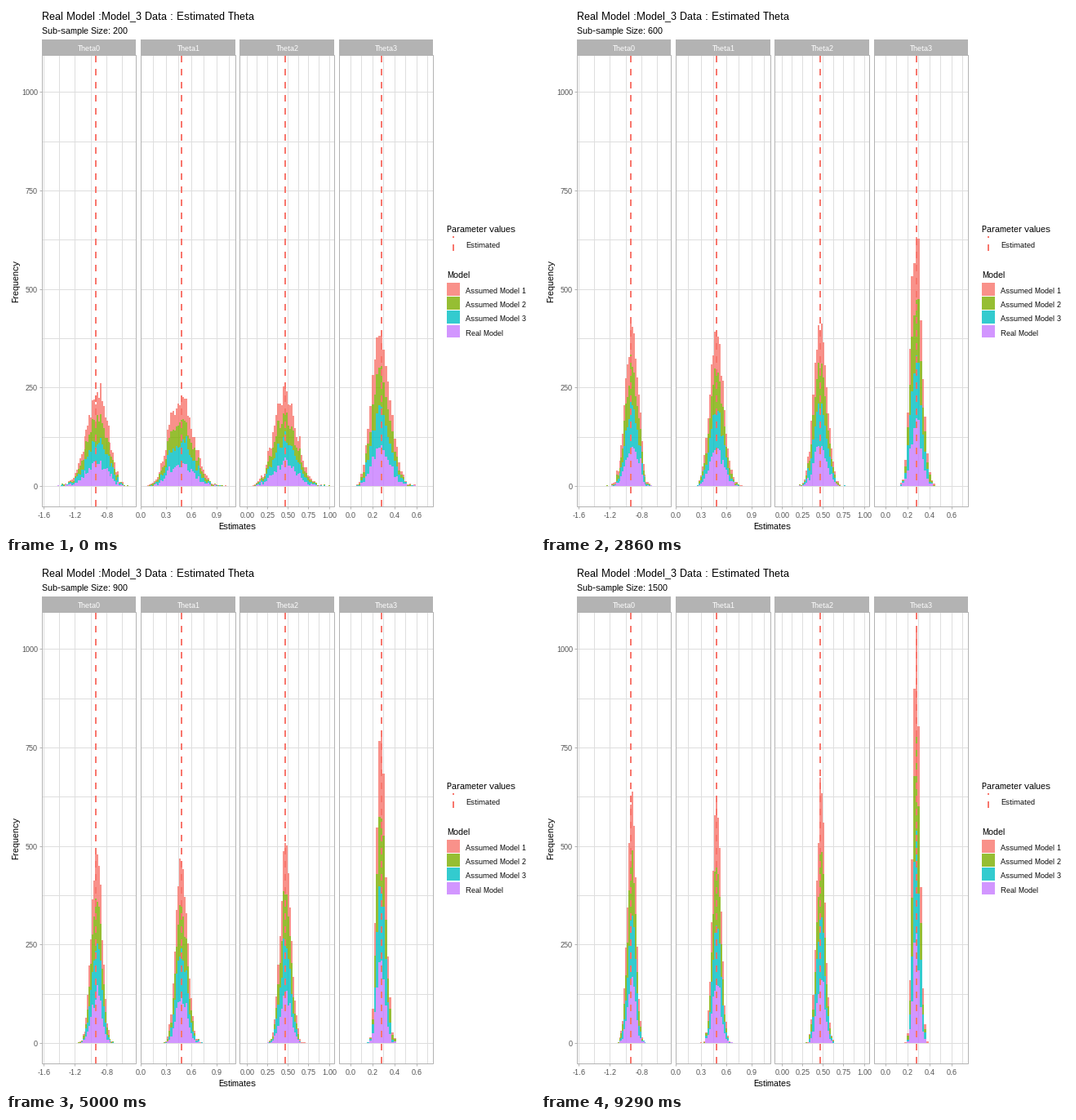
A matplotlib script for the animation above (10000 ms loop, 648 by 648 pixels).

```python
import numpy as np
import matplotlib.pyplot as plt
from matplotlib.animation import FuncAnimation
from matplotlib.patches import Rectangle

plt.rcParams.update({
    "font.family": "Liberation Sans",
    "text.hinting": "native",
    "text.hinting_factor": 1,
})

SIZE = 648
TOP, BOTTOM = 60, 613
SAMPLES = range(200, 1501, 100)
LOOP, STEPS = 10000, 200
BIN = 0.02
RUNS = 1000
GRID, FRAME, TICK_TEXT = "#DEDEDE", "#B3B3B3", "#4D4D4D"
RED = "#F8766D"
# bottom of the stack first
MODELS = [("Real Model", "#C77CFF"), ("Assumed Model 3", "#00BFC4"),
          ("Assumed Model 2", "#7CAE00"), ("Assumed Model 1", RED)]

# left, right, x of zero, px per unit, ticks, format, line x, mean, sd at 1500, skew
PANELS = [
    (44, 159, 201.0, 96.75, (-1.6, -1.2, -0.8), "%.1f", 110, -0.930, 0.0500, -0.06),
    (165, 281, 165.3, 103.3, (0, 0.3, 0.6, 0.9), "%.1f", 215, 0.484, 0.0505, 0.035),
    (286, 402, 295.0, 101.3, (0, 0.25, 0.5, 0.75, 1), "%.2f", 342, 0.468, 0.0490, 0.03),
    (408, 523, 422.2, 135.0, (0, 0.2, 0.4, 0.6), "%.1f", 460, 0.2785, 0.0301, 0.06),
]

fig = plt.figure(figsize=(9, 9), dpi=72, facecolor="white")
ax = fig.add_axes([0, 0, 1, 1])
ax.set_xlim(0, SIZE)
ax.set_ylim(SIZE, 0)
ax.axis("off")


def y_px(count):
    return 588.3 - 0.4824 * count


def text(x, y, s, size=9, color="black", ha="left", **kw):
    return ax.text(x, y, s, size=size, color=color, ha=ha, va="baseline", zorder=6, **kw)


def line(x0, y0, x1, y1, color, z):
    # whole coordinates snap to the middle of that pixel
    ax.plot([x0, x1], [y0, y1], color=color, lw=1, zorder=z, solid_capstyle="butt")


def box(x, y, w, h, color, **kw):
    ax.add_patch(Rectangle((x, y), w, h, fc=color, lw=0, antialiased=False, **kw))


def dashed(x, y0, y1):
    ax.plot([x, x], [y0, y1], color=RED, lw=2, ls=(0, (4, 4)), zorder=4,
            dash_capstyle="butt")


def draw_panel(k, panel):
    left, right, zero, scale, ticks, fmt, mark = panel[:7]
    for v in range(0, 1001, 125):
        y = int(y_px(v))
        line(left, y, right, y, GRID, 1)
    half = (ticks[1] - ticks[0]) / 2
    for j in range(-1, 2 * len(ticks) + 1):
        x = int(zero + scale * (ticks[0] + j * half))
        if left < x < right:
            line(x, TOP, x, BOTTOM, GRID, 1)
    dashed(mark, BOTTOM, TOP)
    ax.add_patch(Rectangle((left, TOP), right - left, BOTTOM - TOP,
                           fill=False, ec=FRAME, lw=1, zorder=5))
    box(left, 41, right - left, 20, FRAME, zorder=5)
    text((left + right + 1) / 2, 55, f"Theta{k}", 9, "white", "center")
    for t in ticks:
        x = int(zero + scale * t)
        line(x, BOTTOM, x, BOTTOM + 3, FRAME, 5)
        text(x + 0.5, 627, fmt % t, 9, TICK_TEXT, "center")


def draw_legend():
    text(540, 277, "Parameter values", 11)
    dashed(548, 300, 282)
    text(563, 296, "Estimated")
    text(540, 333, "Model", 11)
    for i, (name, color) in enumerate(reversed(MODELS)):
        y = round(339.25 + 17.1 * i)
        bottom = round(354.9 + 17.1 * i)
        box(540, y, 16, bottom - y, color, alpha=0.8)
        text(563, y + 13, name)


def bin_edges(panel):
    left, right, zero, scale = panel[:4]
    first = np.ceil((left - zero) / scale / BIN)
    last = np.floor((right - zero) / scale / BIN)
    return (np.arange(first, last + 1) - 0.5) * BIN


for k, panel in enumerate(PANELS):
    draw_panel(k, panel)
for v in range(0, 1001, 250):
    y = int(y_px(v))
    line(41, y, 44, y, FRAME, 5)
    text(39, y + 4, str(v), 9, TICK_TEXT, "right")
draw_legend()

text(44, 16, "Real Model :Model_3 Data : Estimated Theta", 13)
subtitle = text(44, 34, "", 11)
text(283, 641, "Estimates", 11, ha="center")
text(15, 337, "Frequency", 11, ha="center", rotation=90, rotation_mode="anchor")

edges = [bin_edges(p) for p in PANELS]
bars = []
for panel, e in zip(PANELS, edges):
    px = np.round(panel[2] + panel[3] * e)
    flat = np.full(len(e) - 1, 588.0)
    bars.append([ax.stairs(flat, px, baseline=flat, fill=True, color=color, alpha=0.8,
                           lw=0, antialiased=False, zorder=3) for _, color in MODELS])


def update(step):
    i = ((step + 1) * len(SAMPLES) - 1) // STEPS
    n = SAMPLES[i]
    rng = np.random.default_rng(40 + i)
    shrink = np.sqrt(1500 / n)
    subtitle.set_text(f"Sub-sample Size: {n}")
    for panel, e, layers in zip(PANELS, edges, bars):
        mean, sd, skew = panel[7:]
        skew *= np.sqrt(200 / n)
        total = np.zeros(len(e) - 1)
        for layer in layers:
            z = rng.standard_normal(RUNS)
            x = mean + sd * shrink * (z + skew * (z * z - 1))
            base = np.round(y_px(total))
            total = total + np.histogram(x, e)[0]
            layer.set_data(values=np.round(y_px(total)), baseline=base)
    return [subtitle, *sum(bars, [])]


anim = FuncAnimation(fig, update, frames=STEPS, interval=LOOP / STEPS,
                     repeat=True, repeat_delay=0, blit=False)
plt.show()
```
